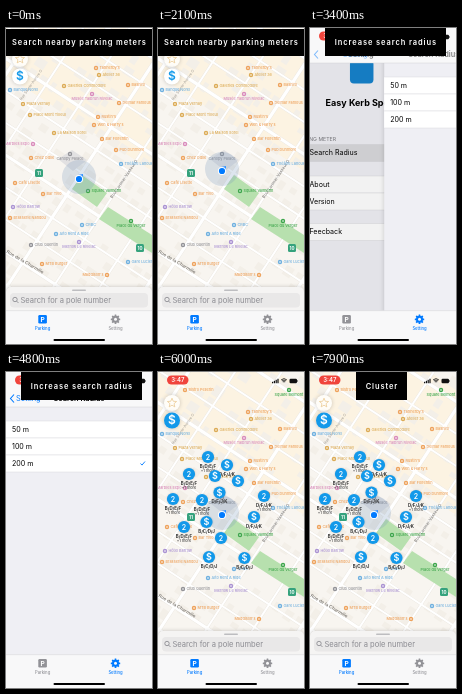
Animation of 146x316 px, one loop 8000 ms. Source, as an HTML page with a canvas:

```html
<!DOCTYPE html>
<html lang="en">
<head>
<meta charset="utf-8">
<title>Parking meter finder</title>
<style>
html, body { margin: 0; width: 100%; height: 100%; overflow: hidden; background: #fff; }
canvas { display: block; width: 146px; height: 316px; }
</style>
</head>
<body>
<canvas id="stage"></canvas>
<script>
const W = 146, H = 316, LOOP = 8000;
const BLUE = '#007aff', PIN = '#1299ea', GREY = '#929297';
const stage = document.getElementById('stage');
const c = stage.getContext('2d');
const dpr = window.devicePixelRatio || 1;
stage.width = W * dpr;
stage.height = H * dpr;

const clamp = v => Math.max(0, Math.min(1, v));
const ramp = (t, from, to) => clamp((t - from) / (to - from));
const easeOut = p => 1 - (1 - p) ** 3;
const easeInOut = p => p * p * (3 - 2 * p);

function box(x, y, w, h, color, r = 0) {
  c.fillStyle = color;
  c.beginPath();
  c.roundRect(x, y, w, h, r);
  c.fill();
}
function disc(x, y, r, color) {
  c.fillStyle = color;
  c.beginPath();
  c.arc(x, y, r, 0, 7);
  c.fill();
}
function poly(points, color) {
  c.fillStyle = color;
  c.beginPath();
  points.forEach(p => c.lineTo(...p));
  c.fill();
}
function line(points, color, width) {
  c.strokeStyle = color;
  c.lineWidth = width;
  c.beginPath();
  points.forEach(p => c.lineTo(...p));
  c.stroke();
}
function text(s, x, y, size, color, weight = 400, align = 'left', spacing = 0) {
  c.font = `${weight} ${size}px Inter, Roboto, sans-serif`;
  c.letterSpacing = spacing + 'px';
  c.textAlign = align;
  c.textBaseline = 'middle';
  c.fillStyle = color;
  c.fillText(s, x, y);
}
function placed(x, y, draw, angle = 0, scale = 1) {
  c.save();
  c.translate(x, y);
  c.rotate(angle);
  c.scale(scale, scale);
  draw();
  c.restore();
}
function shadowed(draw, blur = 4) {
  c.save();
  c.shadowColor = '#0003';
  c.shadowBlur = blur * dpr;
  draw();
  c.restore();
}

// name, icon x, icon y, side of the label (1 right, -1 left, 0 below), colour
const ORANGE = '#eea25c', PINK = '#d98bbb', GOLD = '#dcab55', SKY = '#6fb0df', VIOLET = '#aa92d2';
const GREEN = '#3da54b';
const places = [
  ["Bistro Pellerin", 27, 18, 1, ORANGE], ["Square Belmont", 131, 18, 0, GREEN],
  ["Tannerby's", 90, 40, 1, ORANGE], ["Atelier 36", 93, 47, 1, GOLD],
  ["Galeries Commodore", 58, 58, 1, GOLD], ["Bashiro", 122, 57, 1, ORANGE],
  ["Banque Norel", 4, 62, 1, SKY], ["Musée Talbrun Rivelac", 86, 66, 0, PINK],
  ["Delmar Famous", 113, 75, 1, ORANGE], ["Plaza Vernay", 17, 76, 1, GOLD],
  ["Place Mont Tilleul", 24, 87, 1, GOLD], ["Rustin's", 92, 89, 1, ORANGE],
  ["Wen & Harry's", 88, 97, 1, ORANGE], ["La Maison Sorel", 48, 105, 1, GOLD],
  ["Bar Florentin", 96, 111, 1, ORANGE], ["Marbles Expo", 27, 116, -1, PINK],
  ["Chez Odile", 25, 130, 1, ORANGE], ["Canopy Palace", 64, 126, 0, GREY],
  ["Pub Dunmore", 110, 122, 1, ORANGE], ["Théâtre Lanoue", 115, 136, 1, SKY],
  ["Café Lisette", 9, 155, 1, ORANGE], ["Square Valmorin", 82, 163, 1, GREEN],
  ["Bar Tivo", 37, 166, 1, ORANGE], ["Hôtel Barrow", 7, 179, 1, VIOLET],
  ["Brasserie Nandou", 4, 190, 1, ORANGE], ["CRBC", 76, 197, 1, SKY],
  ["Place du Verger", 125, 193, 0, GREEN], ["Alto Rent A Ride", 50, 206, 1, SKY],
  ["Merrow Le Rivelac", 73, 214, 0, VIOLET], ["Club Quentin", 25, 217, 1, GREY],
  ["MTB Burger", 36, 236, 1, ORANGE], ["Gare Lucienne", 122, 234, 1, SKY],
  ["Maddison's", 101, 247, -1, ORANGE]
];

function roads(color, extra) {
  for (let i = -6; i < 7; i++) {
    const major = i % 3 === 0 ? 1.2 : 0;
    line([[-230, i * 27 + 22], [230, i * 27 + 22]], color, 2 + major + extra);
    line([[i * 39 + 10.5, -230], [i * 39 + 10.5, 230]], color, 2 + major + extra);
  }
}

function drawPlace([name, x, y, side, color]) {
  disc(x, y, 2.2, color);
  disc(x, y, .8, '#fff');
  text(name, x + side * 3.5, y + (side ? 0 : 4.9), 3.8, color, 500, ['right', 'center', 'left'][side + 1]);
}

function drawMap(t) {
  box(0, 0, W, H, '#f8f5f0');
  placed(64, 143, () => {
    let seed = 7;
    const random = () => (seed = seed * 16807 % 2147483647) / 2147483647;
    box(-200, -150, 400, 105, '#fcf3e2');
    for (let y = -160; y < 160; y += 13.5) {
      for (let x = -180; x < 180; x += 13) {
        if (random() < .6) box(x, y, 5 + random() * 7, 5 + random() * 6, '#f3efe8');
      }
    }
    roads('#ebe7e0', .8);
    roads('#fff', 0);
  }, .58);

  poly([[76, 147], [101, 165], [91, 179], [66, 161]], '#b7e0ae');
  poly([[102, 179], [146, 207], [146, 225], [93, 191]], '#b7e0ae');
  poly([[52, 131], [66, 122], [81, 132], [67, 143]], '#e2e1e2');

  placed(118, 151, () => text('Boul Lorimer-Vasseur O', 0, 0, 4, '#77736d', 500, 'center'), -.98);
  placed(19, 234, () => text('Rue de la Charmille', 0, 0, 4.6, '#77736d', 500, 'center'), .53);
  placed(25, 57, () => text('Rue Sainte-Aurore O', 0, 0, 3.8, '#a39e96', 400, 'center'), -.96);

  places.forEach(drawPlace);
  for (const [label, x, y] of [['11', 33, 145], ['10', 134, 220]]) {
    box(x - 4, y - 4, 8, 8, '#35a27d', 1.5);
    text(label, x, y + .5, 4.5, '#fff', 700, 'center');
  }

  // The location and its accuracy circle drift into place.
  const move = easeInOut(ramp(t, 0, 1600));
  const x = 73 - 9 * move, y = 151 - 8 * move;
  disc(x, y - 2, 17, '#7d9cbe42');
  poly([[x - 1, y - 4], [x + 4, y - 5], [x + 4, y]], '#2f91ff');
  disc(x, y, 4.1, '#fff');
  disc(x, y, 3.1, BLUE);
}

const meters = [
  ['2', 50, 85, 'B/D/E/F'], ['$', 69, 93, 'D/F/J/K'], ['2', 31, 102, 'B/D/E/F'],
  ['$', 57, 104, ''], ['$', 80, 109, ''], ['$', 61.5, 120.5, 'D/F/J/K'],
  ['2', 106, 124, 'D/F/J/K'], ['2', 15, 127, 'B/D/E/F'], ['2', 44, 128, 'B/D/E/F'],
  ['$', 96, 145, 'D/F/J/K'], ['$', 48.5, 150, 'B/C/D/J'], ['2', 26, 155, 'B/D/E/F'],
  ['2', 63, 166, ''], ['$', 51, 185, 'B/C/D/J'], ['$', 86.5, 186, 'B/C/D/J']
];

function drawMeters(t) {
  const shown = t < 7200
    ? i => easeOut(ramp(t, 5600 + i * 12, 5800 + i * 12)) * (1 - ramp(t, 6550, 6800))
    : i => easeOut(ramp(t, 7450 + i * 12, 7650 + i * 12));
  meters.forEach(([sign, x, y, zones], i) => {
    const s = shown(i);
    if (s <= 0) return;
    placed(x, y, () => {
      shadowed(() => disc(0, 0, 6.1, PIN), 2);
      text(sign, 0, .4, sign === '$' ? 9 : 7, '#fff', 600, 'center');
      if (!zones) return;
      text(zones, 0, 9.4, 4.4, '#333', 700, 'center');
      if (sign === '2') text('+1 more', 0, 14.2, 3.8, '#444', 500, 'center');
    }, 0, s);
  });
}

function star(x, y, r) {
  c.beginPath();
  for (let i = 0; i < 10; i++) {
    const a = i * Math.PI / 5 - Math.PI / 2, d = i % 2 ? r * .45 : r;
    c.lineTo(x + d * Math.cos(a), y + d * Math.sin(a));
  }
  c.closePath();
  c.strokeStyle = '#e8c48a';
  c.lineWidth = .7;
  c.stroke();
}

function drawMapPage(t) {
  drawMap(t);
  drawMeters(t);
  const active = t > 5550 && t < 6650 || t > 7400;
  shadowed(() => {
    disc(14, 31, 8, '#fffdf8');
    disc(14, 48.5, 8, active ? PIN : '#fff');
  });
  star(14, 31, 4.8);
  text('$', 14, 48.8, 12, active ? '#fff' : PIN, 600, 'center');

  shadowed(() => box(0, 259, W, 60, '#f5f4f3', [5, 5, 0, 0]));
  box(66, 261.5, 14, 1.6, '#bdbdc0', 1);
  box(4, 265, 138, 14.5, '#e9e8e8', 4);
  c.strokeStyle = '#85858b';
  c.lineWidth = .8;
  c.beginPath();
  c.arc(9, 271.5, 2.2, 0, 7);
  c.stroke();
  line([[10.6, 273.1], [12.5, 275]], '#85858b', .8);
  text('Search for a pole number', 14.5, 272.5, 7.55, '#8b8b91');
}

function row(label, x, y, color = '#fff', indent = 6, h = 17) {
  box(x, y, W, h, color);
  line([[x, y], [x + W, y]], '#cfcfd3', .4);
  line([[x, y + h], [x + W, y + h]], '#cfcfd3', .4);
  text(label, x + indent, y + h / 2 + .3, 7.1, '#000');
}

function drawSettings(t, push) {
  const x = -43.8 * push;
  box(0, 0, W, H, '#efeff4');
  box(x + 61.5, 32, 23.5, 23.5, '#1683cc', 4);
  text('Easy Kerb Spots', x + 73, 75.5, 9, '#000', 700, 'center');
  text('PARKING METER', x + 6, 111, 5.2, '#77777c');
  const chosen = t > 3220 && t < 5300;
  row('Search Radius', x, 116.5, chosen ? '#d9d9dc' : '#fff', 21);
  row('About', x, 148, '#fff', 21);
  row('Version', x, 165, '#fff', 21);
  row('Feecback', x, 195.5, '#fff', 21);
  if (push) box(0, 0, W, H, `rgba(0,0,0,${.1 * push})`);
}

function drawRadius(t, x) {
  shadowed(() => box(x, 0, W, H, '#efeff4'), 5);
  const picked = t >= 4100;
  ['50 m', '100 m', '200 m'].forEach((label, i) => {
    const pressed = i === 2 && t >= 4050 && t < 4200;
    row(label, x, 49 + i * 17, pressed ? '#d9d9dc' : '#fff');
    if (i === (picked ? 2 : 0)) {
      const y = 57.5 + i * 17;
      line([[x + 134.5, y], [x + 136, y + 1.6], [x + 139, y - 2]], BLUE, .9);
    }
  });
}

function drawNav(push) {
  box(0, 0, W, 35, '#f8f8f9');
  line([[0, 35], [W, 35]], '#c8c8cc', .4);
  c.globalAlpha = 1 - push;
  text('Setting', 73 - 45 * push, 26.5, 7.4, '#000', 600, 'center');
  c.globalAlpha = push;
  text('Setting', 10 + 45 * (1 - push), 26.5, 7.4, BLUE);
  line([[8, 22.5], [4.5, 26.5], [8, 30.5]], BLUE, 1.1);
  text('Search Radius', 73 + 100 * (1 - push), 26.5, 7.4, '#000', 600, 'center');
  c.globalAlpha = 1;
}

function drawSettingPages(t) {
  const push = t < 4500 ? easeOut(ramp(t, 3300, 3800)) : 1 - easeOut(ramp(t, 4930, 5380));
  drawSettings(t, push);
  if (push) drawRadius(t, W * (1 - push));
  drawNav(push);
}

function gear(x, y, color, hole) {
  placed(x, y, () => {
    for (let i = 0; i < 8; i++) {
      c.rotate(Math.PI / 4);
      box(-.9, -4.7, 1.8, 3, color, .3);
    }
    disc(0, 0, 3.5, color);
    disc(0, 0, 1.5, hole);
  });
}

function drawTabs(onMap) {
  const left = onMap ? BLUE : GREY, right = onMap ? GREY : BLUE;
  box(0, 282.5, W, 34, '#f8f8f9');
  line([[0, 282.7], [W, 282.7]], '#c8c8cc', .4);
  box(32.3, 287, 8.6, 8.6, left, 1.3);
  text('P', 36.6, 291.6, 6.6, '#fff', 700, 'center');
  gear(109.5, 291.3, right, '#f8f8f9');
  text('Parking', 36.6, 300.3, 4.2, left, 500, 'center');
  text('Setting', 109.5, 300.3, 4.2, right, 500, 'center');
  box(47.5, 311, 51.5, 2, '#000', 1);
}

function drawStatus() {
  box(9, 3.5, 21.5, 9, '#f0443c', 4.5);
  text('3:47', 19.8, 8.3, 6, '#fff', 600, 'center');
  for (let i = 0; i < 4; i++) box(114 + i * 1.8, 9.8 - i, 1.2, 1.5 + i, '#111', .3);
  c.strokeStyle = '#111';
  c.lineWidth = .8;
  for (const r of [1.6, 3, 4.4]) {
    c.beginPath();
    c.arc(126, 11.2, r, -2.3, -.84);
    c.stroke();
  }
  box(131.5, 6.8, 7.5, 4.4, '#111', 1.2);
  box(139.3, 8.2, .6, 1.6, '#111');
}

// label, start, end, left, top, width
const captions = [
  ['Search nearby parking meters', 0, 2350, 0, 1, 146],
  ['Increase search radius', 2900, 4900, 15, 0, 121],
  ['Cluster', 7000, LOOP, 46, 0, 51]
];

function drawCaption(t) {
  for (const [label, from, to, x, y, w] of captions) {
    if (t < from || t >= to) continue;
    box(x, y, w, 28 - y, '#000');
    text(label, x + w / 2 + .4, 14.8, 7.5, '#fff', 600, 'center', .9);
  }
}

function frame(now) {
  const t = now % LOOP;
  const onMap = t < 2300 || t >= 5500;
  c.setTransform(dpr, 0, 0, dpr, 0, 0);
  if (onMap) drawMapPage(t);
  else drawSettingPages(t);
  drawTabs(onMap);
  drawStatus();
  drawCaption(t);
}

const start = performance.now();
function tick() {
  frame(performance.now() - start);
  requestAnimationFrame(tick);
}
tick();
</script>
</body>
</html>
```
